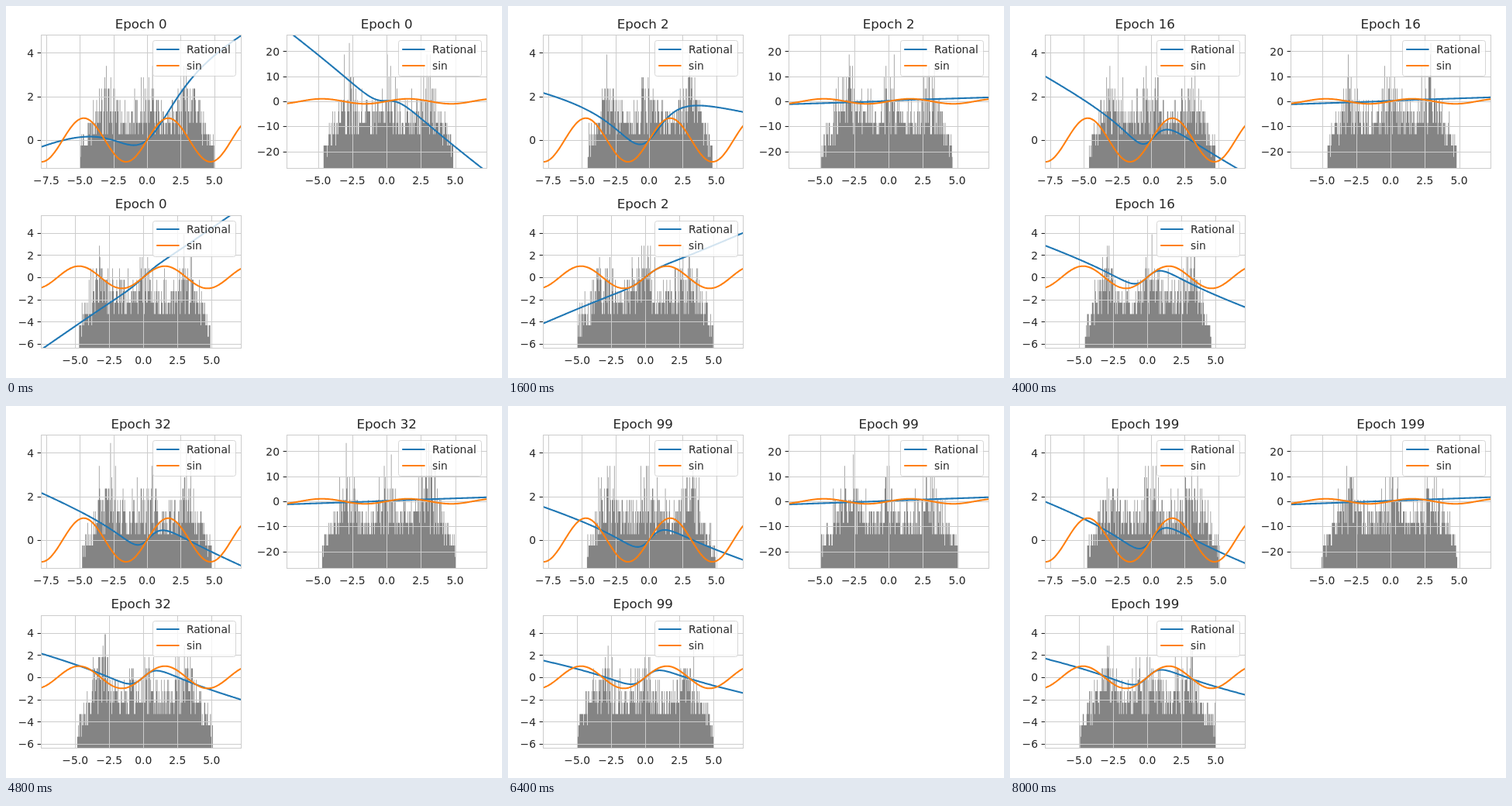
Write an HTML page that moves like this. It is 640 px wide and 480 px high and loops after 8800 ms.

```html
<!DOCTYPE html>
<html lang="en">
<head>
<meta charset="utf-8">
<title>Training epochs</title>
<style>
html, body { margin: 0; width: 100%; height: 100%; overflow: hidden; background: #fff; }
svg { display: block; width: 640px; height: 480px; }
text { font: 13.89px "DejaVu Sans", sans-serif; fill: #262626; }
.title { font-size: 16.67px; text-anchor: middle; }
.grid { stroke: #ccc; fill: none; }
.tick { stroke: #262626; stroke-width: 1.1; }
.curve { fill: none; stroke-width: 2.08; stroke-linejoin: round; stroke-linecap: round; }
</style>
</head>
<body>
<svg id="stage" viewBox="0 0 640 480" xmlns="http://www.w3.org/2000/svg"></svg>
<script>
const STEP_MS = 800;
const EPOCHS = [0, 1, 2, 4, 8, 16, 32, 64, 99, 128, 199];
const BLUE = '#1f77b4', ORANGE = '#ff7f0e';
const WIDTH = 258, LEVEL = 14.7, BIN = 0.7;

// Each key gives the fitted curve at one step: slope, odd bump, even bump, sharpness.
const panels = [
  {
    left: 45, top: 37.4, bottom: 209, x0: 182.1, sx: 17.35, y0: 172.9, sy: 28.15,
    xTicks: [-7.5, 5], yTicks: [0, 4, 2], offset: 0,
    keys: {
      0: [0.32, 0.19, 0.28, 0.1],
      2: [-0.114, 0.69, 0.36, 0.2],
      4: [-0.464, 1.13, 0.5, 0.5],
      5: [-0.33, 0.915, 0.28, 0.5],
      7: [-0.178, 0.777, 0.1, 0.5],
      10: [-0.226, 1.04, 0.12, 0.5]
    }
  },
  {
    left: 362, top: 37.4, bottom: 209, x0: 491.1, sx: 17.7, y0: 123, sy: 3.228,
    xTicks: [-5, 5], yTicks: [-20, 20, 10], offset: 0.2,
    keys: { 0: [-4.1, 4.1, 0, 0.35], 2: [0.18, 0.15, 0, 0.35], 10: [0.2, 0, 0, 0.35] }
  },
  {
    left: 45, top: 269.5, bottom: 441, x0: 177.2, sx: 17.6, y0: 350, sy: 14.33,
    xTicks: [-5, 5], yTicks: [-6, 4, 2], offset: 0,
    keys: {
      0: [0.86, 0.3, 0, 0.5],
      2: [0.54, 0.46, 0, 0.5],
      4: [-0.15, 1.386, 0, 0.5],
      5: [-0.433, 1.52, 0, 0.5],
      7: [-0.233, 1.25, 0, 0.5],
      10: [-0.273, 1.41, 0, 0.5]
    }
  }
];

function add(parent, tag, attrs, text) {
  const el = document.createElementNS('http://www.w3.org/2000/svg', tag);
  for (const name in attrs) el.setAttribute(name, attrs[name]);
  if (text !== undefined) el.textContent = text;
  parent.appendChild(el);
  return el;
}

const snap = v => Math.round(v) + 0.5;
const label = (v, digits) => v.toFixed(digits).replace('-', '\u2212');

function range(from, to, by) {
  const list = [];
  for (let v = from; v <= to; v += by) list.push(v);
  return list;
}

function random(seed) {
  let s = seed >>> 0;
  return () => {
    s = (s + 0x6D2B79F5) >>> 0;
    let t = Math.imul(s ^ (s >>> 15), s | 1);
    t ^= t + Math.imul(t ^ (t >>> 7), t | 61);
    return ((t ^ (t >>> 14)) >>> 0) / 4294967296;
  };
}

function shapeAt(keys, step) {
  const steps = Object.keys(keys).map(Number);
  const before = steps.filter(s => s <= step).pop();
  const after = steps.find(s => s >= step);
  const mix = after === before ? 0 : (step - before) / (after - before);
  return keys[before].map((v, i) => v + (keys[after][i] - v) * mix);
}

function plotPath(p, fn) {
  const points = range(p.left - 1, p.left + WIDTH + 2, 1)
    .map(x => `${x} ${(p.y0 - p.sy * fn((x - p.x0) / p.sx)).toFixed(2)}`);
  return 'M' + points.join('L');
}

function rationalPath(p, step) {
  const [slope, odd, even, sharp] = shapeAt(p.keys, step);
  return plotPath(p, x => p.offset + slope * x + (odd * x + even * x * x) / (1 + sharp * x * x));
}

// Narrow bins of whole counts: three humps on a plateau with tapered ends.
function barsPath(p, seed) {
  const rand = random(seed);
  const normal = () => Math.sqrt(-2 * Math.log(1 - rand())) * Math.cos(2 * Math.PI * rand());
  const from = p.x0 + p.sx * (-4.8 + 0.5 * (rand() - 0.5));
  const to = p.x0 + p.sx * (4.85 + 0.5 * (rand() - 0.5));
  const base = p.bottom + 0.5;
  let d = `M${from} ${base}`;
  for (let x = from; x < to; x += BIN) {
    const v = (x - p.x0) / p.sx;
    const hump = [-3, 0, 3].reduce((sum, c) => sum + Math.exp(-(((v - c) / 0.7) ** 2)), 0);
    const taper = Math.min(1, Math.min(x - from, to - x) / 20);
    const mean = 1.7 + 2.4 * taper + 1.9 * hump;
    const spread = 0.6 + 0.5 * taper + 0.8 * hump;
    const floor = 1 + 1.6 * taper + 0.5 * hump;
    const count = Math.round(Math.max(floor, Math.min(11, mean + spread * normal())));
    d += `V${(base - count * LEVEL).toFixed(1)}H${(x + BIN).toFixed(2)}`;
  }
  return d + `V${base}Z`;
}

function buildLegend(svg, p) {
  const x = snap(p.left + 144), y = p.top + 7;
  const box = { x, y: snap(y), width: 107, height: 46, rx: 2.8 };
  add(svg, 'rect', { ...box, fill: '#fff', stroke: '#ccc', opacity: 0.8 });
  [['Rational', BLUE], ['sin', ORANGE]].forEach(([name, stroke], i) => {
    const lineY = Math.round(y + 11.9 + i * 20.4);
    add(svg, 'path', { class: 'curve', stroke, d: `M${x + 5.5} ${lineY}h27.8` });
    add(svg, 'text', { x: x + 43.5, y: lineY + 5 }, name);
  });
}

function buildPanel(svg, p, index) {
  const frame = {
    x: snap(p.left), y: snap(p.top),
    width: WIDTH, height: snap(p.bottom) - snap(p.top)
  };
  add(add(svg, 'clipPath', { id: 'clip' + index }), 'rect', frame);
  const plot = add(svg, 'g', { 'clip-path': `url(#clip${index})` });

  p.bars = add(plot, 'path', { fill: '#848484' });
  for (const v of range(...p.xTicks, 2.5)) {
    const x = p.x0 + v * p.sx;
    add(plot, 'path', { class: 'grid', d: `M${snap(x)} ${p.top}V${p.bottom}` });
    add(svg, 'text', { x, y: p.bottom + 21, 'text-anchor': 'middle' }, label(v, 1));
  }
  for (const v of range(...p.yTicks)) {
    const y = p.y0 - v * p.sy;
    add(plot, 'path', { class: 'grid', d: `M${p.left} ${snap(y)}h${WIDTH}` });
    add(svg, 'path', { class: 'tick', d: `M${p.left + 0.5} ${snap(y)}h-4.9` });
    add(svg, 'text', { x: p.left - 9, y: Math.round(y + 5.2), 'text-anchor': 'end' }, label(v, 0));
  }
  p.rational = add(plot, 'path', { class: 'curve', stroke: BLUE });
  add(plot, 'path', { class: 'curve', stroke: ORANGE, d: plotPath(p, Math.sin) });
  add(svg, 'rect', { class: 'grid', ...frame });
  p.title = add(svg, 'text', { class: 'title', x: p.left + 129.2, y: Math.round(p.top - 8.3) });
  buildLegend(svg, p);
}

const stage = document.getElementById('stage');
panels.forEach((p, index) => {
  buildPanel(stage, p, index);
  p.states = EPOCHS.map((epoch, step) => ({
    title: 'Epoch ' + epoch,
    bars: barsPath(p, 101 + index * 977 + step * 7919),
    rational: rationalPath(p, step)
  }));
});

let shown = -1;
function render(time) {
  const step = Math.floor(time / STEP_MS) % EPOCHS.length;
  if (step === shown) return;
  shown = step;
  for (const p of panels) {
    const state = p.states[step];
    p.title.textContent = state.title;
    p.bars.setAttribute('d', state.bars);
    p.rational.setAttribute('d', state.rational);
  }
}

const start = performance.now();
function tick() {
  render(performance.now() - start);
  requestAnimationFrame(tick);
}
tick();
</script>
</body>
</html>
```
